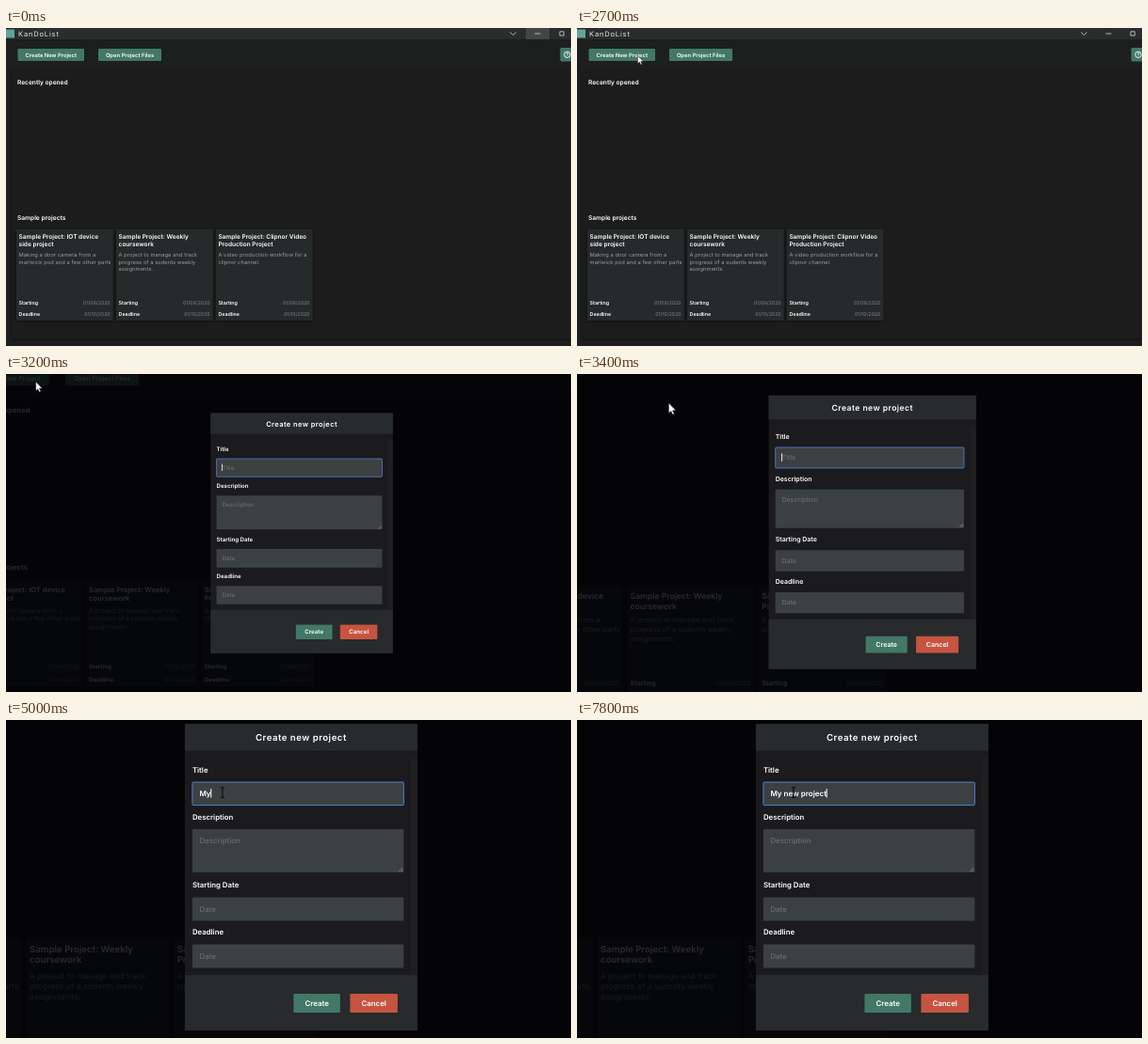
Recreate the animation shown at these times as an HTML page. Size 600 by 338 pixels, loop 8 s.

```html
<!DOCTYPE html>
<html lang="en">
<head>
<meta charset="utf-8">
<title>KanDoList</title>
<style>
  html, body { margin: 0; width: 100%; height: 100%; overflow: hidden; background: #000; }
  svg { display: block; width: 600px; height: 338px; }
  text { font-family: Inter, "Open Sans", sans-serif; font-weight: 600; fill: #fff; white-space: pre; text-rendering: geometricPrecision; }
  .heading { font-size: 6.6px; }
  .button { font-size: 5.85px; text-anchor: middle; }
  .name { font-size: 6.5px; }
  .body { font-size: 5.7px; font-weight: 400; letter-spacing: .09px; fill: #9b9d9d; }
  .key { font-size: 5.3px; }
  .date { font-size: 5.2px; font-weight: 400; text-anchor: end; fill: #858787; }
  .label { font-size: 7.8px; }
  .hint { font-size: 7.9px; font-weight: 500; fill: #696d6e; }
  .typed { font-size: 8px; }
  .action { font-size: 7.9px; text-anchor: middle; }
</style>
</head>
<body>
<svg id="stage" viewBox="0 0 600 338">
  <defs>
    <filter id="shadow" x="-10%" y="-10%" width="120%" height="125%">
      <feDropShadow dx="0" dy="1" stdDeviation="1.6" flood-color="#000" flood-opacity=".55"/>
    </filter>
  </defs>
  <g id="world">
    <g id="page"></g>
    <rect id="mask" width="600" height="338" fill="#000004"/>
    <g id="dialog"></g>
    <path id="arrow" d="M0 0V8.3L1.9 6.6L3.2 9.5L4.5 8.9L3.2 6.1H5.8Z" fill="#fff" stroke="#111" stroke-width=".4"/>
    <path id="beam" d="M-1.5 -3.8Q0 -3.8 0 -3Q0 -3.8 1.5 -3.8M0 -3V3M-1.5 3.8Q0 3.8 0 3Q0 3.8 1.5 3.8" fill="none" stroke="#0c0d0d" stroke-width=".8"/>
  </g>
</svg>
<script>
const LOOP = 8000, STEP = 100;
const ZOOM = 1.48, FOCUS = { x: 316.5, y: 177 };
const GREEN = '#427867';
const $ = id => document.getElementById(id);

const rect = (x, y, w, h, fill, extra = '') =>
  `<rect x="${x}" y="${y}" width="${w}" height="${h}" fill="${fill}" ${extra}/>`;
const text = (x, y, kind, content, extra = '') =>
  `<text x="${x}" y="${y}" class="${kind}" ${extra}>${content}</text>`;
const lines = (x, y, pitch, kind, rows) =>
  rows.map((row, i) => text(x, y + i * pitch, kind, row)).join('');

function button(x, y, w, h, fill, kind, label) {
  return rect(x, y, w, h, fill, 'rx="1"') + text(x + w / 2, y + h / 2 + (kind === 'action' ? 2.8 : 2.1), kind, label);
}

function card(x, name, body) {
  return rect(x, 214, 102.7, 97, '#282a2b', 'filter="url(#shadow)"')
    + lines(x + 2.6, 224.2, 7.8, 'name', name)
    + lines(x + 2.6, 243, 7.5, 'body', body)
    + ['Starting', 'Deadline'].map((key, i) =>
        text(x + 2.6, 294 + 12 * i, 'key', key)
        + text(x + 99.6, 294 + 12 * i, 'date', i ? '01/10/2020' : '01/06/2020')).join('');
}

function field(label, y, h, hint, id = '') {
  return text(198, y - 10.2, 'label', label)
    + rect(198, y, 224.5, h, '#3c4041', `rx="1" ${id && `id="${id}Box"`}`)
    + text(205.5, y + 15, 'hint', hint, id && `id="${id}Hint"`);
}

$('page').innerHTML =
  rect(0, 0, 600, 338, '#1d1f1f')
  + rect(6, 44, 600, 286.5, '#1b1c1c', 'filter="url(#shadow)"')
  + rect(0, 0, 600, 12, '#2a2c2e')
  + rect(552, 0, 25, 12, '#434547', 'id="hover"')
  + rect(0, 1.5, 9, 9, '#63a596')
  + text(13, 8.8, '', 'KanDoList', 'style="font-size:7.5px;font-weight:400;letter-spacing:.85px;fill:#e4e6e6"')
  + '<path d="M535.3 4.5L538.5 7.5L541.7 4.5M561.5 6H567.5M588 3.8H592.3V8.1H588Z" fill="none" stroke="#d6d8d8" stroke-width=".8"/>'
  + button(12.5, 22, 70.5, 13, GREEN, 'button', 'Create New Project')
  + button(98, 22, 67, 13, GREEN, 'button', 'Open Project Files')
  + rect(588.5, 21, 15, 14.5, GREEN, 'rx="1.5"')
  + '<circle cx="596" cy="28.3" r="3.2" fill="none" stroke="#fff" stroke-width=".9"/>'
  + text(596, 30.2, 'button', '?', 'style="font-size:5px"')
  + text(12, 60, 'heading', 'Recently opened')
  + text(12, 204, 'heading', 'Sample projects')
  + card(11, ['Sample Project: IOT device', 'side project'],
      ['Making a door camera from a', 'marlwick pod and a few other parts'])
  + card(117, ['Sample Project: Weekly', 'coursework'],
      ['A project to manage and track', 'progress of a sudents weekly', 'assignments.'])
  + card(222.8, ['Sample Project: Clipnor Video', 'Production Project'],
      ['A video production workflow for a', 'clipnor channel.']);

$('dialog').innerHTML =
  rect(190, 4, 247, 326, '#1b1a1d')
  + rect(430, 40, 7, 231, '#1f1f21')
  + rect(190, 4, 247, 28.5, '#282b2c')
  + rect(190, 271, 247, 59, '#282a2b')
  + text(313.5, 22, '', 'Create new project', 'text-anchor="middle" style="font-size:9.6px;letter-spacing:.5px"')
  + field('Title', 66, 24.5, 'Title', 'title')
  + field('Description', 116, 46, 'Description')
  + field('Starting Date', 188.5, 25, 'Date')
  + field('Deadline', 238.5, 25, 'Date')
  + '<path d="M417.5 161L421.5 157M420 161L421.5 159.5" stroke="#a4a6a6" stroke-width=".7"/>'
  + text(205.5, 80.6, 'typed', '', 'id="typed"')
  + rect(0, 73, 1, 9.5, '#fff', 'id="caret"')
  + button(305.5, 291, 49.5, 20, GREEN, 'action', 'Create')
  + button(365.5, 291, 50.5, 20, '#c65441', 'action', 'Cancel');

const TITLE = 'My new project';
// [time, letters typed so far]
const KEYS = [[4600, 1], [4900, 2], [5400, 3], [5800, 4], [6000, 5], [6200, 6], [6400, 7],
  [6700, 8], [6800, 9], [6900, 10], [7200, 12], [7500, 13], [7800, 14]];
// [time, x, y] of the pointer on the unzoomed page
const POINTER = [[300, 566, 6], [1500, 91, 50], [2400, 64.5, 29.5], [3050, 64.5, 29.5],
  [3200, 71, 31.5], [3600, 230, 101], [3900, 258, 109.5]];

const progress = (t, from, to) => Math.min(1, Math.max(0, (t - from) / (to - from)));
const show = (id, on) => $(id).setAttribute('visibility', on ? 'visible' : 'hidden');

function pointerAt(t) {
  const next = POINTER.findIndex(p => p[0] > t);
  if (next < 0) return POINTER[POINTER.length - 1].slice(1);
  if (next === 0) return POINTER[0].slice(1);
  const [t0, x0, y0] = POINTER[next - 1], [t1, x1, y1] = POINTER[next];
  const p = progress(t, t0, t1), e = p * p * (3 - 2 * p);
  return [x0 + (x1 - x0) * e, y0 + (y1 - y0) * e];
}

function draw(t) {
  const zoom = 1 + (ZOOM - 1) * progress(t, 3000, 3600);
  $('world').setAttribute('transform',
    `translate(${FOCUS.x * (1 - zoom)} ${FOCUS.y * (1 - zoom)}) scale(${zoom})`);
  show('hover', t < 300);

  const opening = 1 - (1 - progress(t, 2700, 3000)) ** 2;
  const size = (.865 + .135 * opening) / ZOOM;
  $('mask').setAttribute('opacity', .84 * opening);
  $('dialog').setAttribute('opacity', opening);
  $('dialog').setAttribute('transform',
    `translate(${314.4 - 2 * (1 - opening)} ${170.3 - 6.5 * (1 - opening)}) scale(${size}) translate(-313.5 -167)`);

  const focused = t >= 2900;
  $('titleBox').setAttribute('stroke', focused ? '#4b7fd1' : 'none');
  const count = KEYS.reduce((n, [at, letters]) => t >= at ? letters : n, 0);
  $('typed').textContent = TITLE.slice(0, count);
  show('titleHint', count === 0);
  show('caret', focused);
  $('caret').setAttribute('x', 205.2 + (count ? $('typed').getComputedTextLength() : 0));

  const [x, y] = pointerAt(t);
  const inField = t > 3600 && x > 236.5;
  for (const id of ['arrow', 'beam']) $(id).setAttribute('transform', `translate(${x} ${y})`);
  show('arrow', t >= 300 && !inField);
  show('beam', inField);
}

const start = performance.now();
function tick() {
  const t = (performance.now() - start) % LOOP;
  draw(Math.floor(t / STEP) * STEP);
  requestAnimationFrame(tick);
}
tick();
</script>
</body>
</html>
```
